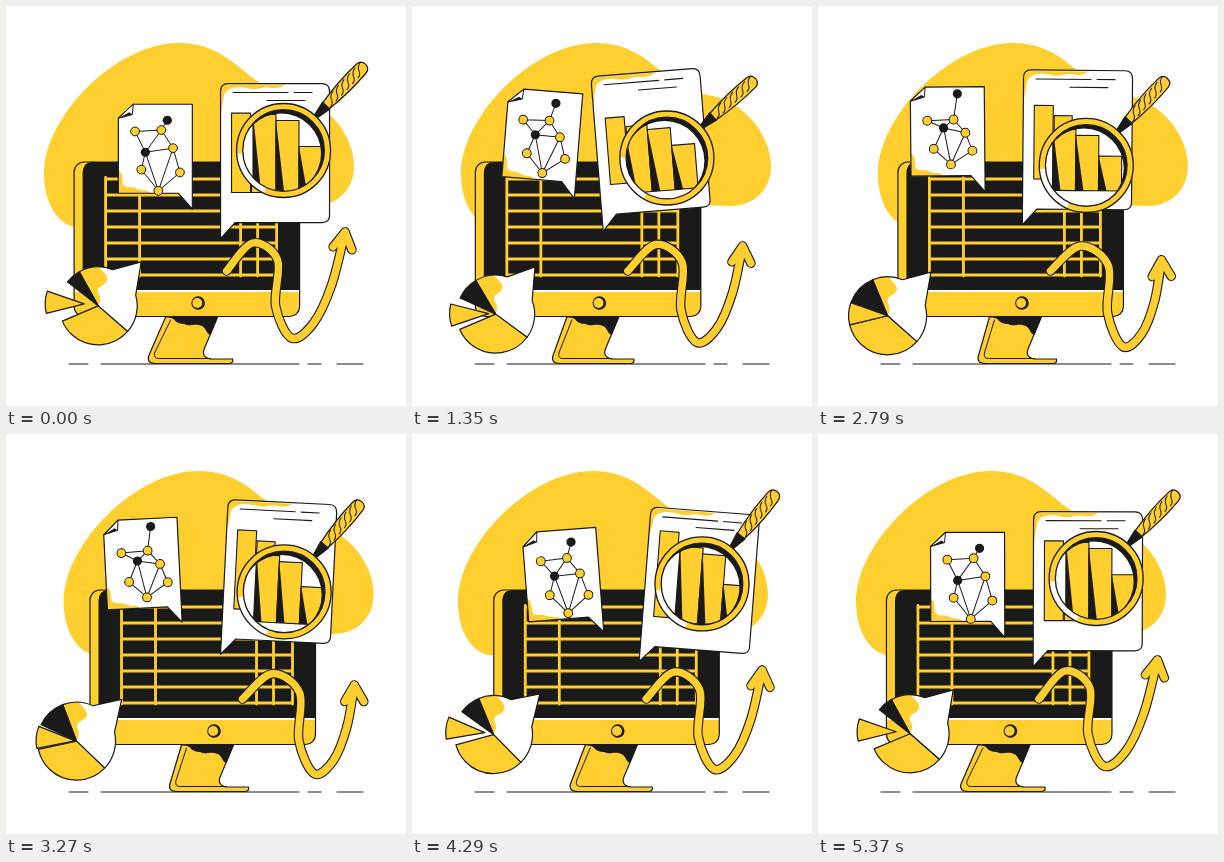
Write an HTML page with a canvas that moves like this. It is 400 px wide and 400 px high and loops after 5.4 s.

```html
<!DOCTYPE html>
<html lang="en">
<head>
<meta charset="utf-8">
<title>Data analysis</title>
<style>
  html, body { margin: 0; width: 100%; height: 100%; overflow: hidden; background: #fff; }
  canvas { display: block; width: 400px; height: 400px; }
</style>
</head>
<body>
<canvas id="stage" width="400" height="400"></canvas>
<script>
const ctx = document.getElementById('stage').getContext('2d');
const LOOP = 5400, STEP = 30;
const YELLOW = '#ffcf2f', BLACK = '#1b1a1a', WHITE = '#fff';
const RAD = Math.PI / 180;

const mix = (a, b, k) => a + (b - a) * k;
const polar = (r, deg) => [r * Math.cos(deg * RAD), r * Math.sin(deg * RAD)];

function shape(path, fill, stroke, width = 1.2) {
  const p = typeof path === 'string' ? new Path2D(path) : path;
  if (fill) { ctx.fillStyle = fill; ctx.fill(p, 'evenodd'); }
  if (stroke) { ctx.strokeStyle = stroke; ctx.lineWidth = width; ctx.stroke(p); }
}

function at(x, y, degrees, draw) {
  ctx.save();
  ctx.translate(x, y);
  ctx.rotate(degrees * RAD);
  draw();
  ctx.restore();
}

function circle(x, y, r) {
  const path = new Path2D();
  path.arc(x, y, r, 0, 2 * Math.PI);
  return path;
}

function sector(r, from, to) {
  const path = new Path2D();
  path.moveTo(0, 0);
  path.arc(0, 0, r, from * RAD, to * RAD);
  path.closePath();
  return path;
}

// Catmull-Rom curve through the points
function smooth(pts) {
  const path = new Path2D();
  const get = i => pts[Math.max(0, Math.min(pts.length - 1, i))];
  path.moveTo(...pts[0]);
  for (let i = 0; i < pts.length - 1; i++) {
    const [a, b, c, d] = [get(i - 1), get(i), get(i + 1), get(i + 2)];
    path.bezierCurveTo(b[0] + (c[0] - a[0]) / 6, b[1] + (c[1] - a[1]) / 6,
      c[0] - (d[0] - b[0]) / 6, c[1] - (d[1] - b[1]) / 6, c[0], c[1]);
  }
  return path;
}

const blob = `M38 168C38 110 110 37 173 37C228 37 240 83 285 89
  C322 95 348 130 348 160C348 186 328 201 306 200C220 196 150 222 68 221C48 216 38 192 38 168Z`;

function stand(u) {
  const x = 6 * u;
  shape(`M160 311L${143 + x} 350Q${141 + x} 357.500 ${150 + x} 357.500H224Q228 357 227 353H205
    Q195 351 199 342L212 311Z`, YELLOW, BLACK);
  shape(`M165 314L${149 + x} 347Q${148 + x} 352.500 ${153 + x} 352.500H205`, null, BLACK, 1);
  shape('M163 311H212L205 329C200 328 201 320 193 319C187 318 184 321 179 318Q171 318 168 313Z', BLACK);
}

function monitor() {
  const frame = new Path2D();
  frame.roundRect(68.5, 156, 225.5, 154.5, 10);
  shape(frame, YELLOW);
  shape('M77 284V168Q77 156 87 156H284Q294 156 294 166V284Z', BLACK);
  shape('M70 285H294', null, WHITE, 2);
  shape(frame, null, BLACK);
  const table = new Path2D();
  for (const x of [100, 134, 235, 252, 271]) { table.moveTo(x, 171.5); table.lineTo(x, 270); }
  for (let i = 0; i < 7; i++) { table.moveTo(100, 173 + 16 * i); table.lineTo(271, 173 + 16 * i); }
  shape(table, null, YELLOW, 2.8);
  shape(circle(192.5, 297, 6), BLACK, BLACK, 1.6);
  shape(circle(191.7, 297, 5), YELLOW);
}

// A flattening arc of nodes around a hub, with one stray node
function network(u) {
  const ring = Array.from({ length: 6 }, (_, i) => {
    const [x, y] = polar(24 + 7 * Math.cos(1.7 * i), 56 * i - 136);
    return [x + 2, y * mix(1.15, 0.85, u) + 8];
  });
  const hub = [mix(-10, -4, u), mix(4, -3, u)], stray = [mix(12, 10, u), mix(-28, -37, u)];
  const lines = new Path2D();
  const link = (a, b) => { lines.moveTo(...a); lines.lineTo(...b); };
  ring.forEach((p, i) => {
    if (i) link(ring[i - 1], p);
    if (i !== 3) link(hub, p);
  });
  link(ring[1], stray);
  link(ring[2], ring[4]);
  shape(lines, null, BLACK, 1);
  for (const p of ring) shape(circle(...p, 4.4), YELLOW, BLACK, 1);
  for (const p of [hub, stray]) shape(circle(...p, 4.6), BLACK);
}

function networkPage(u) {
  const page = 'M-37 -30L-22 -44H37V61L23 45H-37Z';
  shape(page, WHITE);
  shape('M-37 22Q-33 24 -33 31Q-34 39 -27 39C-20 38 -17 43 -10 42Q-6 43 -5 45H-37Z', YELLOW);
  shape(page, null, BLACK);
  shape('M-37 -30L-22 -44L-23 -34Z', WHITE, BLACK, 1);
  shape('M-37 -30L-23 -34L-26 -36Z', BLACK);
  network(u);
}

function bar(x, top, width, bottom) {
  shape(`M${x} ${top}h${width}V${bottom}H${x}Z`, YELLOW, BLACK, 1.1);
}

function chartPage(height) {
  const page = 'M-47 -70H47Q54.500 -70 54.500 -62V62Q54.500 69 47 69H-40L-54.500 85V-62Q-54.500 -70 -47 -70Z';
  shape(page, WHITE);
  shape('M-54 -40V-64Q-53 -69 -47 -69H10Q4 -64 -6 -66C-14 -67 -17 -63 -26 -65C-38 -68 -49 -66 -51 -58Z', YELLOW);
  shape(page, null, BLACK);
  shape('M-42 -61H13M19 -61H37M-8 -53H30', null, BLACK, 1.1);
  bar(-43.5, 39 - height, 19, 39);
  bar(-23.5, 49 - height, 18, 39);
}

function grip() {
  shape('M47 -2L62 -5Q65 0 62 5L47 2Z', BLACK, BLACK);
  shape('M62 -4.500Q88 -8 113 -6.500Q119 -6 119 0Q119 6 113 6.500Q88 8 62 4.500Z', YELLOW, BLACK);
  for (let x = 64; x < 105; x += 8) {
    shape(`M${x} 4C${x + 8} 4 ${x + 3} -4 ${x + 13} -5`, null, BLACK, 1);
  }
}

function lens(tilt, middle, third, bottom) {
  const glass = circle(0, 0, 41);
  shape(glass, WHITE);
  ctx.save();
  ctx.clip(glass);
  at(0, 0, -tilt, () => {
    [-36, -30, third].forEach((top, i) => {
      const x = middle + 23 * (i - 1);
      bar(x, top, 23, bottom);
      shape(`M${x} ${top}V${bottom}h8Z`, BLACK);
    });
  });
  const shadow = circle(0, 0, 41);
  shadow.addPath(circle(-2.5, 3, 40));
  shape(shadow, BLACK);
  ctx.restore();

  at(0, 0, tilt - 46.5, grip);
  shape(circle(0, 0, 44), null, YELLOW, 6.5);
  const glint = new Path2D();
  glint.arc(0, 0, 44, (115 + tilt) * RAD, (176 + tilt) * RAD);
  ctx.lineCap = 'butt';
  shape(glint, null, WHITE, 5.5);
  ctx.lineCap = 'round';
  for (const r of [47, 40.8]) shape(circle(0, 0, r), null, BLACK, 1.3);
}

function arrow(u) {
  const keys = [[221, 265], [247, 237], [272, 254], [270, 300], [286, 332], [308, 317], [326, 279], [339.5, 226]];
  const pts = keys.map(([x, y], i) => {
    const k = i / (keys.length - 1), sway = Math.sin(Math.PI * k);
    return [x + u * (9 * sway - 7.5 * k ** 3), y + u * (7 * sway + 28 * k ** 5)];
  });
  const path = smooth(pts);
  const [x, y] = pts[pts.length - 1];
  for (const side of [-30, 30]) {
    const [dx, dy] = polar(19, mix(99, 89, u) + side);
    path.moveTo(x, y);
    path.lineTo(x + dx, y + dy);
  }
  shape(path, null, BLACK, 9.6);
  shape(path, null, YELLOW, 7.4);
}

function pie(u) {
  const R = 39, blackEnd = mix(-119, -113, u);
  const bubble = new Path2D();
  bubble.moveTo(0, 0);
  bubble.arc(0, 0, R, blackEnd * RAD, -68 * RAD);
  bubble.lineTo(43, -44);
  bubble.arc(0, 0, R, -16 * RAD, 41 * RAD);
  bubble.closePath();
  shape(bubble, WHITE);
  ctx.save();
  ctx.clip(bubble);
  shape('M0 0L-24 -45H2C-3 -36 10 -34 9 -26C7 -19 -2 -21 0 -13Q4 -8 0 0Z', YELLOW);
  ctx.restore();
  shape(bubble, null, BLACK);
  shape(sector(R, 41, mix(157, 166, u)), YELLOW, BLACK);
  shape(sector(R, mix(-142, -160, u), blackEnd), BLACK, BLACK);
  at(14 * (u - 1), 2 * (u - 1), 0, () => shape(sector(R, 166, 199), YELLOW, BLACK));
}

function draw(t) {
  // Every part swings once per loop; peak is the time of its largest value.
  const wave = (mid, amp, peak) => mid + amp * Math.cos(2 * Math.PI * (t - peak) / LOOP);
  const u = wave(0.5, -0.5, 0);
  const tilt = wave(0, 4.6, LOOP / 4);
  const shift = wave(5, -11.5, 930);
  const barBottom = 41 - 18 * wave(0.5, 0.5, 2350) ** 2;

  ctx.fillStyle = WHITE;
  ctx.fillRect(0, 0, 400, 400);
  ctx.lineCap = ctx.lineJoin = 'round';

  at(22 * u, 0, 0, () => shape(blob, YELLOW));
  shape('M63 358H82M95 358H293M302 358H315M331 358H357', null, BLACK, 1);
  at(shift, 0, 0, () => { stand(u); monitor(); });
  at(wave(139, 13.5, 4800), wave(133.3, -10, 2300), tilt, () => networkPage(u));
  at(wave(263, -25, 1560), wave(140.7, -8.2, 2200), -tilt, () => chartPage(wave(76, -10, 1650)));
  at(wave(272, -18, 1620), 144.5 + 15 * u, 0,
    () => lens(tilt, wave(-9.5, -8, 1560), wave(-7, -6, 1800), barBottom));
  at(shift, 0, 0, () => arrow(u));
  at(wave(81, 11.5, 200), wave(305, 6, 2230), -tilt, () => pie(u));
}

const start = performance.now();
function tick() {
  const t = (performance.now() - start) % LOOP;
  draw(Math.floor(t / STEP) * STEP);
  requestAnimationFrame(tick);
}
tick();
</script>
</body>
</html>
```
